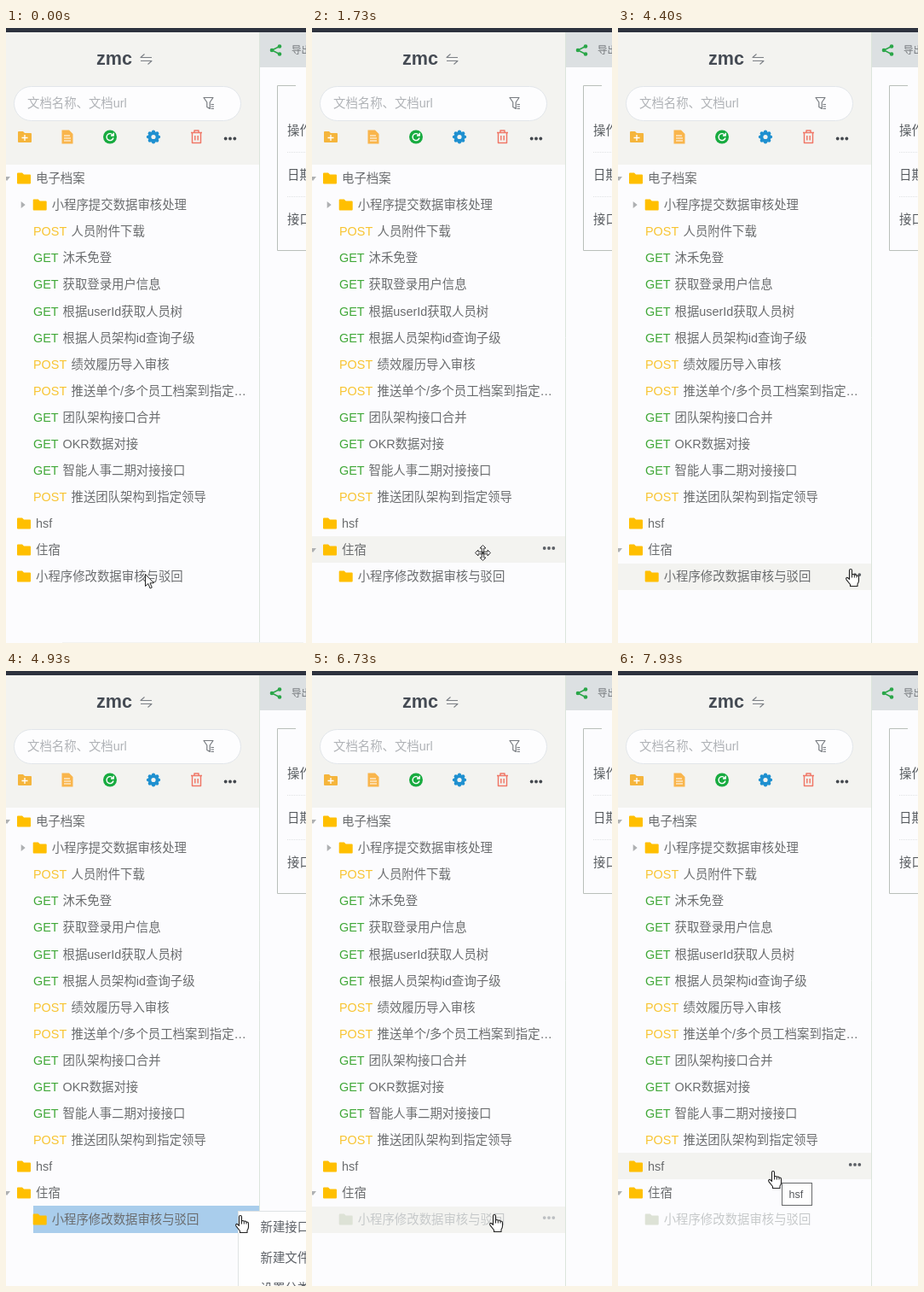
These frames come from a looping animation (352 px wide and 720 px high, 8000 ms). An HTML page with a canvas:

```html
<!DOCTYPE html>
<html lang="zh">
<head>
<meta charset="utf-8">
<style>
html, body { margin: 0; width: 100%; height: 100%; overflow: hidden; background: #fcfcfe; }
canvas { display: block; }
</style>
</head>
<body>
<canvas id="stage" width="352" height="720"></canvas>
<script>
const c = document.getElementById('stage').getContext('2d');
const LOOP = 8000, STEP = 1000 / 15, PITCH = 31.07, TOP = 160.5;
const FONT = '"Liberation Sans", "Noto Sans CJK SC", "Noto Sans CJK", sans-serif';
const PALE = '#f3f3f0', PAGE = '#fcfcfe', INK = '#6a6c6e', AMBER = '#ffbf00';
const MOVED = 15;
const MOVED_NAME = '小程序修改数据审核与驳回';

// kind: d = folder, G = GET, P = POST
const rows = [
  ['d', '电子档案', 0, 'down'],
  ['d', '小程序提交数据审核处理', 1, 'right'],
  ['P', '人员附件下载'],
  ['G', '沐禾免登'],
  ['G', '获取登录用户信息'],
  ['G', '根据userId获取人员树'],
  ['G', '根据人员架构id查询子级'],
  ['P', '绩效履历导入审核'],
  ['P', '推送单个/多个员工档案到指定…'],
  ['G', '团队架构接口合并'],
  ['G', 'OKR数据对接'],
  ['G', '智能人事二期对接接口'],
  ['P', '推送团队架构到指定领导'],
  ['d', 'hsf', 0],
  ['d', '住宿', 0]
];

// pointer hotspot: [ms, x, y]
const track = [
  [0, 163, 641], [200, 163, 641], [530, 182, 627], [800, 200, 614],
  [1930, 200, 614], [2400, 238, 640], [2600, 262, 645], [2790, 272, 633],
  [3400, 272, 633], [3520, 273, 633], [4390, 273, 633], [4720, 274, 634],
  [4860, 274, 634], [4995, 276, 640], [5400, 276, 640], [5725, 312, 748],
  [6400, 284, 684], [6720, 214, 636], [6930, 214, 636], [7460, 182, 585], [LOOP, 182, 585]
];

const mid = i => TOP + PITCH * (i + .5);
const within = (t, a, b) => t >= a && t < b;

function pointer(t) {
  const q = Math.floor(t / STEP + .06) * STEP;
  const i = Math.max(1, track.findIndex(k => k[0] > q));
  const [t0, x0, y0] = track[i - 1], [t1, x1, y1] = track[i];
  const p = (q - t0) / (t1 - t0);
  return [Math.round(x0 + (x1 - x0) * p), Math.round(y0 + (y1 - y0) * p)];
}

function rect(x, y, w, h, color) {
  c.fillStyle = color;
  c.fillRect(x, y, w, h);
}

function text(s, x, y, color = INK, size = 14.4, weight = '') {
  c.font = `${weight} ${size}px ${FONT}`;
  c.fillStyle = color;
  c.fillText(s, x, y + size * .36);
}

function shape(d, fill, stroke, width = 1, x = 0, y = 0) {
  c.save();
  c.translate(x, y);
  const p = new Path2D(d);
  if (fill) { c.fillStyle = fill; c.fill(p); }
  if (stroke) { c.strokeStyle = stroke; c.lineWidth = width; c.lineJoin = 'round'; c.stroke(p); }
  c.restore();
}

function circle(x, y, r, color) {
  c.beginPath();
  c.arc(x, y, r, 0, 7);
  c.fillStyle = color;
  c.fill();
}

function dots(x, y, color) {
  for (const d of [-5.3, 0, 5.3]) circle(x + d, y, 1.9, color);
}

function dashed(x0, y0, x1, y1, color, dash) {
  c.setLineDash(dash);
  shape(`M${x0} ${y0}L${x1} ${y1}`, null, color);
  c.setLineDash([]);
}

function folder(x, y, color = AMBER) {
  shape('M1 -6.5H6L8 -4.5H15Q16 -4.5 16 -3.5V5.5Q16 6.5 15 6.5H1Q0 6.5 0 5.5V-5.5Q0 -6.5 1 -6.5Z', color, null, 1, x, y);
}

function caret(x, y, dir) {
  shape(dir === 'down' ? 'M-4 -2H4L0 3Z' : 'M-2 -4V4L3 0Z', '#aeb0b2', null, 1, x, y);
}

function folderRow(name, level, y, arrow, faded) {
  const x = 13 + 18.7 * level;
  if (arrow) caret(1 + 18.7 * level, y, arrow);
  folder(x, y, faded ? '#dde2d6' : AMBER);
  text(name, x + 22, y, faded ? '#c6c9ca' : INK);
}

function toolbar() {
  rect(0, 0, 297, 160, PALE);
  text('zmc', 106, 35, '#454b54', 21.6, 'bold');
  shape('M171 34.5H158L162.5 30.5M158 38.5H171L166.5 42.5', null, '#7b7f85', 1.1);
  c.beginPath();
  c.roundRect(9.5, 68.5, 266, 40, 20);
  c.fillStyle = '#fdfdfe';
  c.fill();
  c.strokeStyle = '#e2e6ea';
  c.lineWidth = 1;
  c.stroke();
  text('文档名称、文档url', 25, 88, '#b0b3b7');
  shape('M232 81.5H243L239.2 87V94.5L235.8 92.5V87ZM240.5 89.5H244M240.5 92H244M240.5 94.5H244', null, '#777b80', 1.2);

  folder(14, 127.5, '#f5b53c');
  shape('M22 125V132M18.5 128.5H25.5', null, '#fff', 1.3);
  shape('M65.5 119.5H74L78.5 124V135.5H65.5Z', '#f9b54c');
  shape('M68 126H75M68 129H76M68 132H76', null, '#fff', 1);
  circle(122, 127.5, 8, '#18ab40');
  shape('M125.5 125.5A4 4 0 1 0 126 128.5M126.3 122.8V126H123', null, '#fff', 1.4);
  for (let i = 0; i < 8; i++) {
    const a = i * Math.PI / 4;
    circle(173 + 6 * Math.cos(a), 127.5 + 6 * Math.sin(a), 2.1, '#1f90d0');
  }
  circle(173, 127.5, 6.3, '#1f90d0');
  circle(173, 127.5, 2.6, PALE);
  shape('M217 122.5H230M221 122V120H226V122M218.5 123V134.5H228.5V123M221.8 126V131.5M225.2 126V131.5', null, '#f07868', 1.5);
  dots(263, 129.5, '#44484e');
}

function detail() {
  rect(298, 5, 54, 41, '#dce0e2');
  shape('M321 21.5L312 26L321 30.5', null, '#2aa648', 1.4);
  circle(321, 21.5, 2.3, '#2aa648');
  circle(312, 26, 2.3, '#2aa648');
  circle(321, 30.5, 2.3, '#2aa648');
  text('导出', 335, 26, '#707478', 11.5);
  shape('M340 67.5H318.5V260.5H352', null, '#b9bfba');
  ['操作', '日期', '接口'].forEach((s, i) => text(s, 330, 120 + 52 * i, '#565a5e'));
  for (const y of [145.5, 197.5]) dashed(330, y, 352, y, '#e0e2e4', [1, 1]);
  shape('M297.5 5V720', null, '#dbe5dc');
}

function tree(t, hot) {
  const nested = t >= 1730, faded = t >= 6270;
  const quiet = t < 70 || within(t, 270, 1730) || within(t, 4530, 6470);
  const hover = quiet ? -1 : Math.floor((hot[1] - TOP) / PITCH);
  const lit = hover >= 13 && hover <= MOVED;

  if (lit) rect(0, Math.round(TOP + PITCH * hover), 297, 31, PALE);
  if (within(t, 4530, 6270)) rect(32, 626, 265, 32, '#a9cdec');

  rows.forEach(([kind, name, level, arrow], i) => {
    const y = mid(i);
    if (kind === 'd') return folderRow(name, level, y, i === 14 && nested ? 'down' : arrow);
    const post = kind === 'P';
    text(post ? 'POST' : 'GET', 32, y, post ? '#f8c430' : '#40a838');
    text(name, post ? 76.5 : 66.5, y);
  });
  folderRow(MOVED_NAME, nested ? 1 : 0, mid(MOVED), null, faded);
  if (lit) dots(278, mid(hover) - 2, hover === MOVED && faded ? '#bcbfc2' : '#5c6066');
}

function ghost(t, [x, y]) {
  if (t < 70) rect(66, 719, 283, 1, PALE);
  if (!within(t, 270, 1730)) return;
  c.save();
  c.globalAlpha = .65;
  c.translate(x - 168, y - 641);
  rect(14, 626, 283, 32, PALE);
  folderRow(MOVED_NAME, 0, mid(MOVED));
  c.restore();
}

function menu(t, [x, y]) {
  if (!within(t, 4530, 6270)) return;
  c.save();
  c.globalAlpha = Math.min(1, (t - 4460) / 260);
  rect(272, 632, 80, 88, '#dfe3e4');
  rect(273, 633, 79, 87, '#fefefe');
  ['新建接口', '新建文件夹', '设置分类'].forEach((s, i) => {
    const top = 633 + 36 * i;
    if (t >= 5470 && y >= top && y < top + 36) rect(273, top, 79, 36, PALE);
    text(s, 298.5, top + 18, '#5c6066');
  });
  c.restore();
}

function tip(s, x, y, w) {
  rect(x, y, w, 27, '#66686a');
  rect(x + 1, y + 1, w - 2, 25, '#fefefe');
  text(s, x + 8.5, y + 13, '#585a5e', 12.5);
}

function cursor(t, [x, y]) {
  if (within(t, 5730, 6470)) return;
  if (t < 70) {
    shape('M0 0V14L3.3 11L5.6 16.5L7.8 15.5L5.5 10.3H10Z', '#fff', '#222', 1, 163.5, 639.5);
  } else if (within(t, 270, 2000)) {
    for (let i = 0; i < 4; i++) {
      c.save();
      c.translate(x + .5, y + .5);
      c.rotate(i * Math.PI / 2);
      shape('M0 -9L3.5 -5.5H1.2V-1.2H-1.2V-5.5H-3.5Z', '#fff', '#333');
      c.restore();
    }
    rect(x - .5, y - .5, 2, 2, '#333');
  } else {
    shape('M-1.5 12V2Q-1.5 .5 0 .5Q1.5 .5 1.5 2V7Q3 5.7 4.3 7.4Q6 6.4 7 8.2Q9.5 7.6 9.5 10V14Q9.5 16 8 18V20.5H-.5V18.5L-5 12.8Q-6 11 -4.5 10.4Q-3.3 10.2 -1.5 12.5Z', '#fff', '#222', 1.1, x, y);
    shape('M1.5 7V10.5M4.3 8V10.5M7 8.6V10.5', null, '#222', 1, x, y);
  }
}

function draw(now) {
  const t = now % LOOP, hot = pointer(t);
  rect(0, 0, 352, 720, PAGE);
  toolbar();
  tree(t, hot);
  detail();
  rect(0, 0, 352, 5, '#2d323e');
  ghost(t, hot);
  menu(t, hot);
  if (within(t, 3270, 4400)) tip('更多操作', 282, 648, 67);
  if (t >= 7930) tip('hsf', 192, 599, 36);
  cursor(t, hot);
  requestAnimationFrame(() => draw(performance.now()));
}
draw(0);
</script>
</body>
</html>
```
